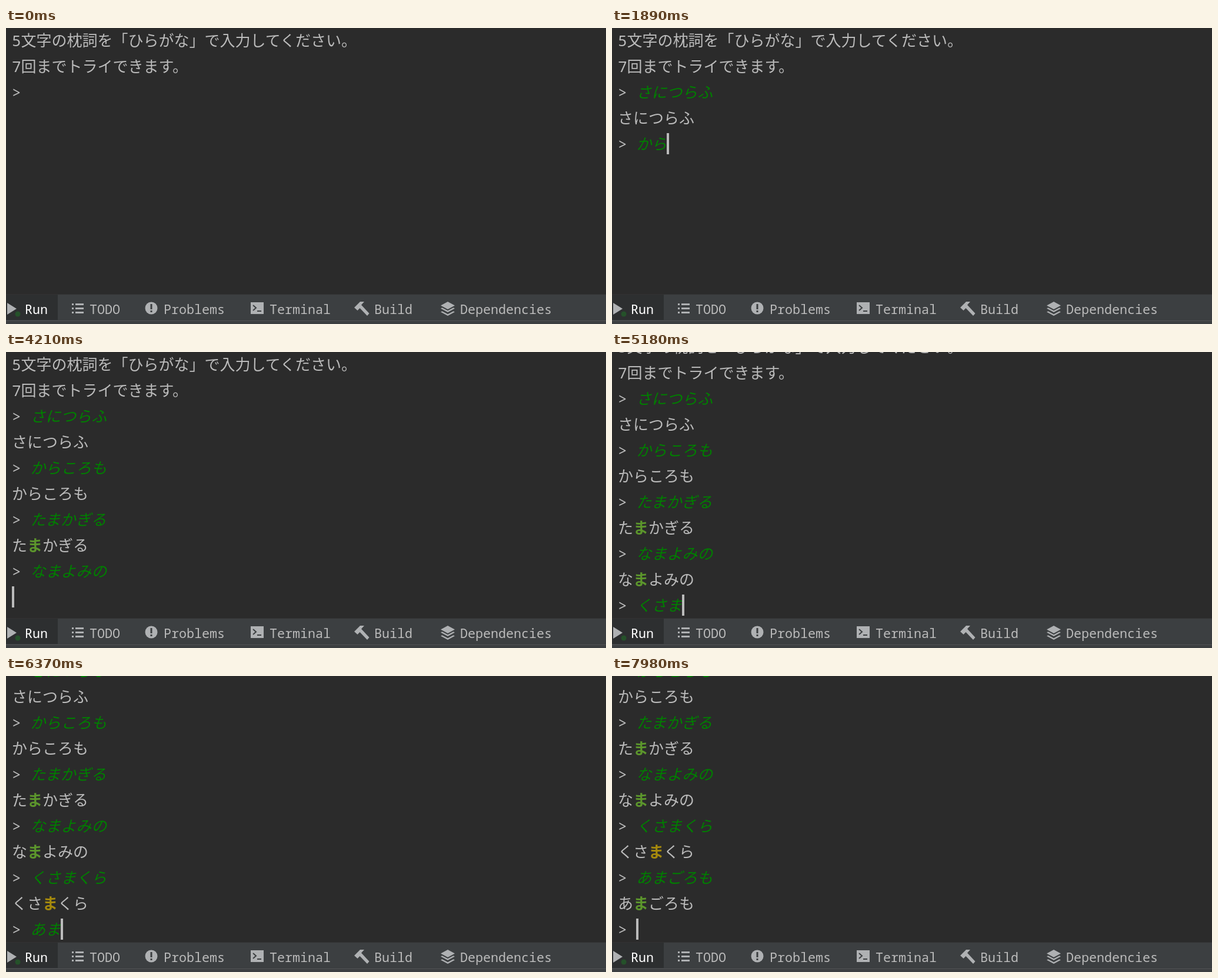
An HTML page for the animation above (8000 ms loop, 1020 by 504 pixels).

```html
<!DOCTYPE html>
<html lang="ja">
<head>
<meta charset="utf-8">
<title>枕詞</title>
<style>
  html, body { margin: 0; width: 100%; height: 100%; overflow: hidden; background: #2b2b2b; }
  #console { position: absolute; inset: 0 0 auto 0; height: 453px; overflow: hidden; }
  #lines { position: absolute; left: 10px; top: -1px; color: #bbb; white-space: pre;
    font: 350 26px/44px "Noto Sans Mono", "Noto Sans CJK JP", "Noto Sans CJK", monospace; }
  #lines div { height: 44px; }
  #lines i { color: #007f00; }
  #lines b { font-weight: 700; }
  .hit { color: #5c962c; }
  .near { color: #a68a0d; }
  #caret { position: absolute; width: 4px; height: 36px; background: #bbb; }
  svg { position: absolute; left: 0; top: 0; }
  text { font: 500 21.67px "Noto Sans Mono", monospace; fill: #bbb; }
</style>
</head>
<body>
<div id="console"><div id="lines"></div><div id="caret"></div></div>
<svg width="1020" height="504" fill="#afb1b3">
  <path fill="#323232" d="M0 453h1020v1H0z"/>
  <path fill="#3c3f41" d="M0 454h1020v50H0z"/>
  <path fill="#2d2f30" d="M0 454h88v43H0z"/>
  <path fill="#515355" d="M0 498h1020v1H0z"/>

  <path d="M2 468L18 478L2 488z"/>
  <circle cx="20" cy="487" r="4.5" fill="#25512a"/>
  <path d="M112 469h3v3h-3zm6 0h14v3h-14zM112 476h3v3h-3zm6 0h14v3h-14zM112 483h3v3h-3zm6 0h14v3h-14z"/>
  <circle cx="247" cy="477" r="10.5"/>
  <path fill="#3c3f41" d="M245.5 470h3v9h-3zm0 11h3v3h-3z"/>
  <path d="M416 467h22v20h-22z"/>
  <path fill="none" stroke="#3c3f41" stroke-width="2" d="M420 472l5 4.5l-5 4.5M427 482h7"/>
  <path d="M592 476L602 466H609L604 471.500L617.500 486L614 490L601.500 477L597.500 481z"/>
  <path d="M751 466l12 6.500l-12 6.500l-12-6.500zM739 477.500l2.500-1.300l9.500 5.100l9.500-5.100l2.500 1.300l-12 6.500zM739 483.500l2.500-1.300l9.500 5.100l9.500-5.100l2.500 1.300l-12 6.500z"/>

  <text x="32" y="487" style="fill:#fff">Run</text>
  <text x="142" y="487">TODO</text>
  <text x="268" y="487">Problems</text>
  <text x="448" y="487">Terminal</text>
  <text x="626" y="487">Build</text>
  <text x="772" y="487">Dependencies</text>

  <path id="pointer" fill="none" stroke="#ddd" stroke-width="3"
    d="M-9.500-16H-2M2-16H9.500M0-16V16M-9.500 16H-2M2 16H9.500"/>
</svg>
<script>
const LOOP = 8000, ROW = 44, CHAR = 26, BLINK = 500, REPLY_DELAY = 70;
const INTRO = ['5文字の枕詞を「ひらがな」で入力してください。', '7回までトライできます。'];

// start and step time the typing; mark is the index of the coloured letter
const guesses = [
  { word: 'さにつらふ', start: 140, step: 105, enter: 1050 },
  { word: 'からころも', start: 1610, step: 150, enter: 2310 },
  { word: 'たまかぎる', start: 2900, step: 75, enter: 3290, mark: 1, kind: 'hit' },
  { word: 'なまよみの', start: 3640, step: 105, enter: 4200, mark: 1, kind: 'hit' },
  { word: 'くさまくら', start: 4950, step: 105, enter: 5500, mark: 2, kind: 'near' },
  { word: 'あまごろも', start: 6270, step: 75, enter: 6640, mark: 1, kind: 'hit' },
];

const [lines, caret, pointer] = ['lines', 'caret', 'pointer'].map(id => document.getElementById(id));
let shown = '';

const reply = ({ word, mark, kind }) => [...word]
  .map((c, i) => i === mark ? `<b class="${kind}">${c}</b>` : c).join('');

function consoleAt(t) {
  const rows = [...INTRO, '&gt; '];
  let caretX = 41, lastEvent = -930;
  for (const g of guesses) {
    if (t < g.start) break;
    const typed = Math.min(g.word.length, Math.floor((t - g.start) / g.step) + 1);
    rows[rows.length - 1] += `<i>${g.word.slice(0, typed)}</i>`;
    caretX = 41 + typed * CHAR;
    lastEvent = g.start + (typed - 1) * g.step;
    if (t < g.enter) break;
    if (t < g.enter + REPLY_DELAY) {
      rows.push('');
      caretX = 10;
      lastEvent = g.enter;
      break;
    }
    rows.push(reply(g), '&gt; ');
    caretX = 41;
    lastEvent = g.enter + REPLY_DELAY;
  }
  return { rows, caretX, caretOn: Math.floor((t - lastEvent) / BLINK) % 2 === 0 };
}

function movePointer(t) {
  const p = Math.min(1, Math.max(0, (t - 560) / 560));
  const x = 652.5 + 83 * Math.max(0, 1 - p * 1.9) ** 2;
  const y = 369 - 299.5 * p * p * (3 - 2 * p);
  pointer.setAttribute('transform', `translate(${x} ${y})`);
  pointer.style.display = t >= 560 && t < 1610 ? '' : 'none';
}

function draw(t) {
  const { rows, caretX, caretOn } = consoleAt(t);
  const html = rows.map(r => `<div>${r}</div>`).join('');
  if (html !== shown) lines.innerHTML = shown = html;
  const caretY = 3 + ROW * (rows.length - 1);
  const scroll = Math.max(0, caretY - 413);
  lines.style.transform = `translateY(${-scroll}px)`;
  caret.style.left = caretX + 'px';
  caret.style.top = caretY - scroll + 'px';
  caret.style.visibility = caretOn ? 'visible' : 'hidden';
  movePointer(t);
}

const begin = performance.now();
function tick() {
  draw((performance.now() - begin) % LOOP);
  requestAnimationFrame(tick);
}
tick();
</script>
</body>
</html>
```
